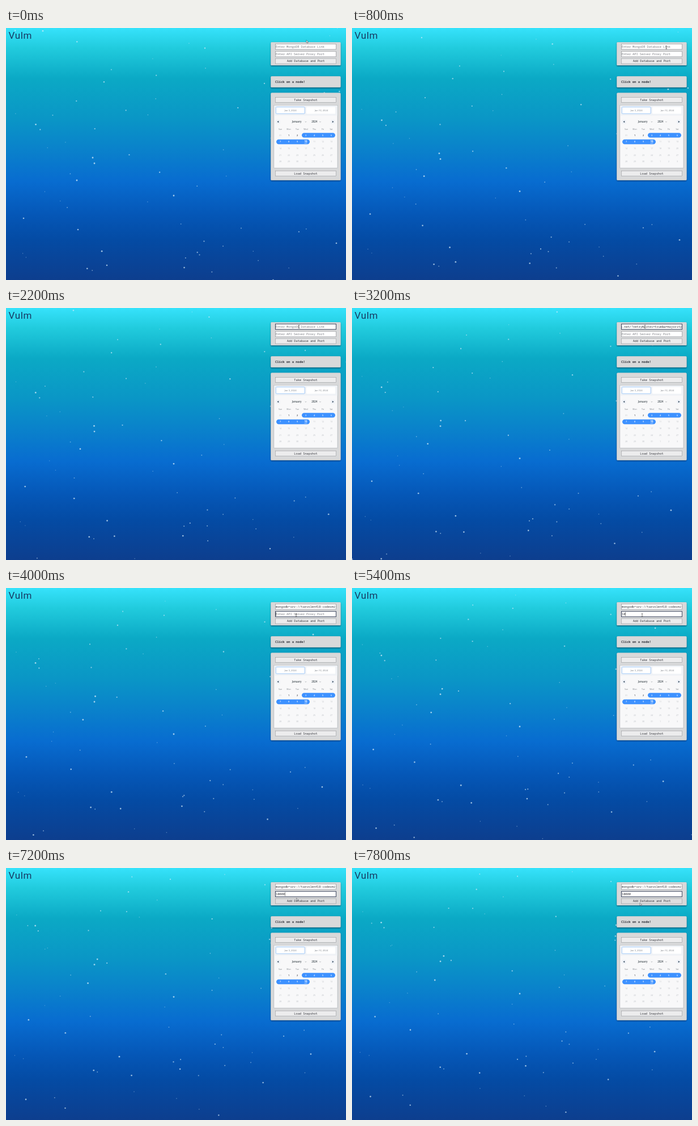
An HTML page that plays this animation: 600 by 445 pixels, repeating every 8 s.

```html
<!DOCTYPE html>
<html lang="en">
<head>
<meta charset="utf-8">
<title>Vulm</title>
<style>
  html, body { margin: 0; width: 100%; height: 100%; overflow: hidden; }
  svg { display: block; width: 600px; height: 445px; }
  text { white-space: pre; }
  .mono { font: 5.3px "Noto Sans Mono", monospace; }
  .mono.strong { font-size: 5.5px; font-weight: 700; }
  .sans { font-family: "Open Sans", sans-serif; text-anchor: middle; }
  .title { font: 400 17px Roboto, sans-serif; letter-spacing: .6px; }
</style>
</head>
<body>
<svg id="stage" viewBox="0 0 600 445">
  <defs>
    <linearGradient id="sea" x2="0" y2="1">
      <stop offset="0" stop-color="#36e2fb"/>
      <stop offset=".08" stop-color="#21cbdd"/>
      <stop offset=".2" stop-color="#0ba9c5"/>
      <stop offset=".36" stop-color="#0a96c6"/>
      <stop offset=".48" stop-color="#0a82cb"/>
      <stop offset=".61" stop-color="#086cd0"/>
      <stop offset=".74" stop-color="#0557b7"/>
      <stop offset=".84" stop-color="#044ba4"/>
      <stop offset="1" stop-color="#0d3e8e"/>
    </linearGradient>
    <filter id="shadow" x="-10%" y="-20%" width="120%" height="150%">
      <feDropShadow dx="0" dy="1.2" stdDeviation=".9" flood-color="#00152c" flood-opacity=".6"/>
    </filter>
    <clipPath id="linkClip"><rect x="475.8" y="28" width="106.4" height="10"/></clipPath>
  </defs>
  <rect width="600" height="445" fill="url(#sea)"/>
</svg>
<script>
const stage = document.getElementById('stage');

function add(tag, attrs, content = '') {
  const node = document.createElementNS('http://www.w3.org/2000/svg', tag);
  for (const key in attrs) node.setAttribute(key, attrs[key]);
  node.textContent = content;
  stage.append(node);
  return node;
}
const box = (x, y, width, height, fill, more = {}) =>
  add('rect', { x, y, width, height, fill, ...more });
const mono = (x, y, content, more = {}) =>
  add('text', { x, y, class: 'mono', fill: '#33343b', ...more }, content);
const sans = (x, y, size, fill, content, more = {}) =>
  add('text', { x, y, class: 'sans', 'font-size': size, fill, ...more }, content);

// Bubbles rise at one speed, each in its own slightly tilted direction.
const SPEED = 9.5, MAX_TILT = 0.75, BUBBLES = 75, SEA_HEIGHT = 465;

function seeded(seed) {
  return () => {
    seed = (seed * 1664525 + 1013904223) % 2 ** 32;
    return seed / 2 ** 32;
  };
}
const random = seeded(7);
const bubbles = [];

function addBubble(x, y, tilt, size) {
  const dot = add('circle', { r: 0.7 + 0.7 * size, fill: '#d5ecfa', opacity: 0.4 + 0.35 * size });
  bubbles.push({ x, y, vx: SPEED * Math.sin(tilt), vy: -SPEED * Math.cos(tilt), dot });
}
// The brightest few, then a random scatter.
addBubble(296, 296, 0, 1);
addBubble(153, 229, 0.12, 1);
addBubble(156, 239, 0, 1);
addBubble(125, 269, 0.29, 1);
addBubble(31, 336, 0.13, 0.9);
addBubble(127, 356, -0.33, 0.9);
addBubble(178, 419, 0.69, 0.9);
addBubble(583, 380, -0.72, 0.9);
while (bubbles.length < BUBBLES)
  addBubble(random() * 600, random() * SEA_HEIGHT, (random() * 2 - 1) * MAX_TILT, random() ** 1.5);

function panel(y, height) {
  box(467.3, y, 123.2, height, '#d8d9da', { rx: 1.5, filter: 'url(#shadow)' });
  box(467.9, y + .6, 122, height - 1.2, 'none', { rx: 1.2, stroke: '#cdcfd1', 'stroke-width': .7 });
}
function button(y, label) {
  const face = box(475.4, y, 107, 9, '#ececed', { stroke: '#898b90', 'stroke-width': .5 });
  mono(529, y + 6.4, label, { 'text-anchor': 'middle' });
  return face;
}
const field = y => box(475.4, y, 107, 9.6, '#fff', { stroke: '#85878c', 'stroke-width': .6 });

add('text', { x: 4.5, y: 18.6, class: 'title', fill: '#173a63' }, 'Vulm');

panel(25, 41);
const linkField = field(28.2), portField = field(41.2);
const linkText = mono(476, 35, '', { 'clip-path': 'url(#linkClip)' });
const portText = mono(476, 48, '');
const caret = box(0, 42.5, .5, 7, '#222');
const addButton = button(54, 'Add Database and Port');

panel(85.3, 19.5);
mono(475, 97, 'Click on a node!', { class: 'mono strong', fill: '#2b2d36' });

panel(114.4, 154.4);
button(122.4, 'Take Snapshot');
button(252.2, 'Load Snapshot');

// Calendar
const BLUE = '#3d91ff', FADED = '#b8bcc1', INK = '#2a2e36';
box(472.8, 136.4, 112.2, 110.8, '#f8f8f9', { stroke: '#a9adb2', 'stroke-width': .6 });
box(473.2, 136.8, 111.4, 17.8, '#eff2f6');
box(476.3, 139.5, 50.8, 11.8, '#fff', { rx: 1.2, stroke: '#69a9f5', 'stroke-width': .6 });
box(530, 139.4, 51.2, 12, '#fff', { rx: 1.2 });
sans(502, 147, 4.2, '#777c84', 'Jan 3, 2024');
sans(556.5, 147, 4.2, '#777c84', 'Jan 10, 2024');
for (const [x, way] of [[480, -1], [577, 1]]) {
  box(x - 3.6, 162, 7.2, 7.2, '#eff2f7', { rx: 1.2 });
  add('path', { d: `M${x + way * 1.5} 165.6l${-way * 2.7} -1.7v3.4z`, fill: '#34495e' });
}
sans(513, 167.3, 4.5, '#3e484f', 'January', { 'font-weight': 600 });
sans(544.3, 167.3, 4.5, '#3e484f', '2024', { 'font-weight': 600 });
for (const x of [529, 554.4])
  add('path', { d: `M${x - 1.3} 165l1.3 1.3 1.3-1.3`, fill: 'none', stroke: '#70767d', 'stroke-width': .5 });

box(522, 185.2, 59, 8.4, BLUE, { rx: 4.2 });
box(477, 196.8, 59, 8.4, BLUE, { rx: 4.2 });
const columnX = column => 484 + column * 15;
'Sun Mon Tue Wed Thu Fri Sat'.split(' ').forEach((name, i) =>
  sans(columnX(i), 180, 3.5, '#777d85', name));
for (let cell = 0; cell < 35; cell++) {
  const day = (cell + 30) % 31 + 1;
  const chosen = cell >= 3 && cell <= 10;
  const today = cell === 10;
  const fill = chosen ? '#fff' : cell === 1 || cell === 2 ? INK : FADED;
  const x = columnX(cell % 7), y = 190.9 + Math.floor(cell / 7) * 11.55;
  sans(x, y, today ? 4.3 : 3.7, fill, day, { 'font-weight': today ? 700 : fill === FADED ? 400 : 600 });
  if (today) box(x - 2.5, y + .8, 5, .5, '#fff');
}

// Pointers
const beam = add('path', {
  d: 'M-1.3-2.8Q0-2.8 0-2Q0-2.8 1.3-2.8M0-2V2M-1.3 2.8Q0 2.8 0 2Q0 2.8 1.3 2.8',
  fill: 'none', stroke: '#222', 'stroke-width': .6
});
const arrow = add('path', {
  d: 'M-1-2.6V2.2L.2 1.3 1 3 1.9 2.5 1.1.9H2.5Z', fill: '#eef3f6', stroke: '#3a3a42', 'stroke-width': .5
});
const moves = [
  { start: 0, end: 1400, x: 570, y: 41 },
  { start: 1400, end: 2200, x: 517, y: 33 },
  { start: 3400, end: 3800, x: 512, y: 48 },
  { start: 5600, end: 6400, x: 518, y: 47 },
  { start: 6800, end: 7600, x: 509, y: 64 }
];
function pointerAt(t) {
  let x = 531, y = 24;
  for (const move of moves) {
    const u = Math.min(1, Math.max(0, (t - move.start) / (move.end - move.start)));
    const eased = u * u * (3 - 2 * u);
    x += (move.x - x) * eased;
    y += (move.y - y) * eased;
  }
  return [x, y];
}

function show(node, content, placeholder) {
  node.textContent = content || placeholder;
  node.setAttribute('fill', content ? '#33343b' : '#7b7d83');
}
function focus(node, on) {
  node.setAttribute('stroke', on ? '#26304c' : '#85878c');
  node.setAttribute('stroke-width', on ? .9 : .6);
}
const setVisible = (node, on) => node.setAttribute('visibility', on ? 'visible' : 'hidden');

const LINK_FOCUS = 2200, LINK_PASTE = 2600, PORT_FOCUS = 3800, TYPE_START = 5000, KEY_TIME = 300;
const STEP = 200, LOOP = 8000;

function draw(t) {
  for (const { x, y, vx, vy, dot } of bubbles) {
    dot.setAttribute('cx', x + vx * t / 1000);
    dot.setAttribute('cy', (y + vy * t / 1000 + SEA_HEIGHT) % SEA_HEIGHT);
  }

  const onPort = t >= PORT_FOCUS;
  const pasted = t >= LINK_PASTE;
  const scrolled = pasted && !onPort;
  focus(linkField, t >= LINK_FOCUS && !onPort);
  focus(portField, onPort);
  const link = scrolled ? 's.net/?retryWrites=true&w=majority' : 'mongodb+srv://tarvolen418:codesmith';
  show(linkText, pasted ? link : '', 'Enter MongoDB Database Link');
  linkText.setAttribute('x', scrolled ? 582 : 476);
  linkText.setAttribute('text-anchor', scrolled ? 'end' : 'start');

  const keys = Math.max(0, Math.floor((t - TYPE_START) / KEY_TIME) + 1);
  const typed = '10000'.slice(0, keys);
  show(portText, typed, 'Enter API Server Proxy Port');
  caret.setAttribute('x', 476.2 + typed.length * 3.18);
  setVisible(caret, onPort && t < 7400);

  const [x, y] = pointerAt(t);
  const overField = y > 28 && y < 52;
  setVisible(beam, overField);
  setVisible(arrow, !overField);
  for (const pointer of [beam, arrow]) pointer.setAttribute('transform', `translate(${x} ${y})`);
  addButton.setAttribute('fill', y > 54 ? '#dededf' : '#ececed');
}

function tick() {
  draw(Math.floor(performance.now() % LOOP / STEP) * STEP);
  requestAnimationFrame(tick);
}
tick();
</script>
</body>
</html>
```
